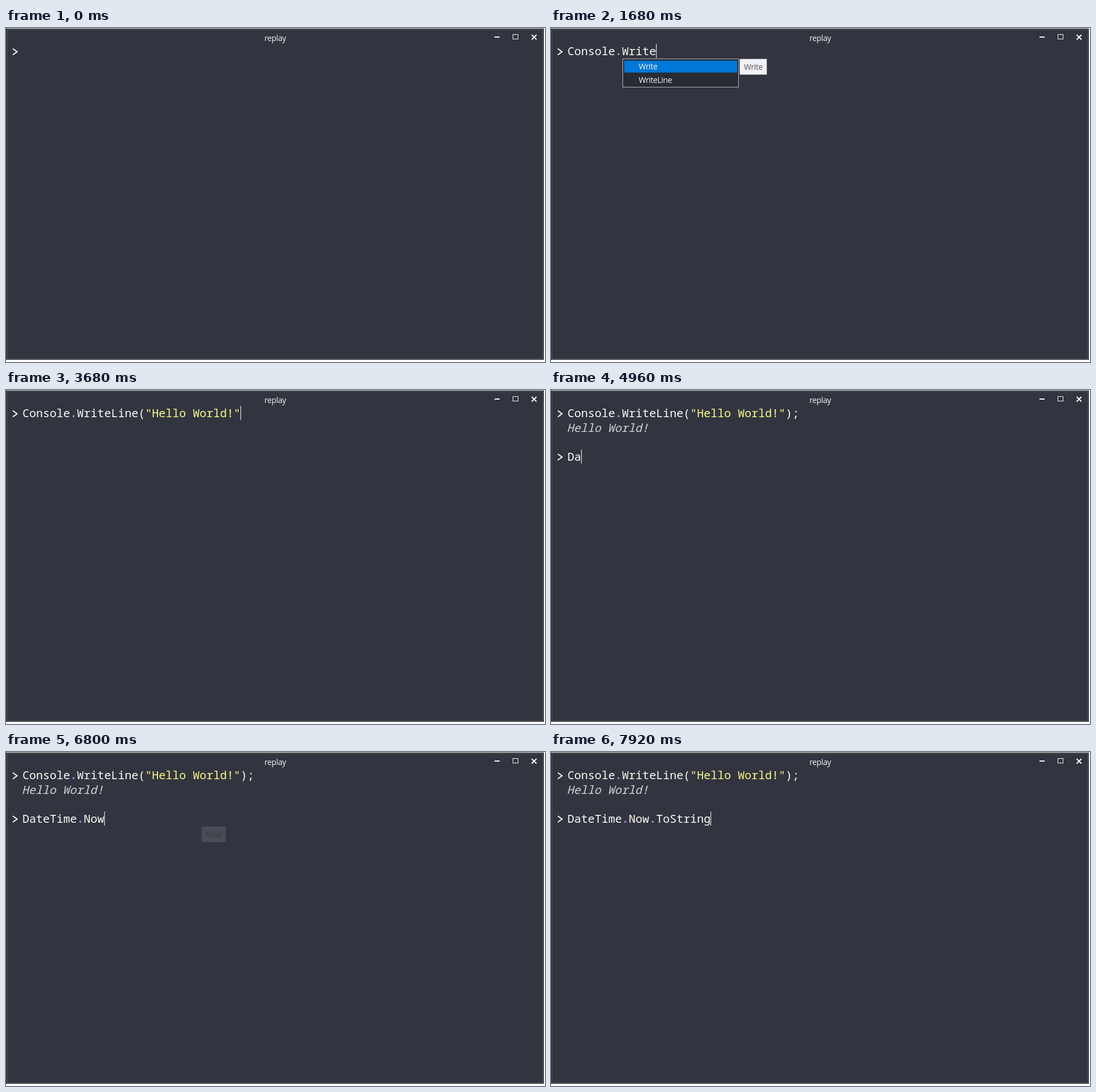
An HTML page for the animation above (8 s loop, 950 by 590 pixels).

```html
<!DOCTYPE html>
<html lang="en">
<head>
<meta charset="utf-8">
<title>replay</title>
<style>
html, body { margin: 0; width: 100%; height: 100%; overflow: hidden; background: #fff; }
svg { display: block; }
text { font: 14px "Open Sans", "Noto Sans", sans-serif; letter-spacing: -.38px; fill: #f2f2f0; white-space: pre; }
.code { font: 500 20.03px "Noto Sans Mono", monospace; letter-spacing: 0; fill: #fbfbf7; }
.dot { fill: #b47be8; font-weight: 700; }
.str { fill: #fbf98e; }
.out { font-style: italic; font-weight: 400; fill: #d2d3d0; }
.icon { fill: none; stroke: #f8f8f8; }
.caret { fill: #d8d8d8; }
.popup { fill: #292b34; stroke: #b2b3ba; }
.thumb { fill: #8a8a8b; }
.pick { fill: #0078d7; }
.tip rect { fill: #f1f2f7; stroke: #767676; }
.tip text { fill: #575757; }
</style>
</head>
<body>
<svg width="950" height="590" viewBox="0 0 950 590">
  <rect y="1" width="948" height="585" fill="#17191d"/>
  <rect x="1" y="2" width="946" height="583" fill="#5d6264"/>
  <rect x="2" y="3" width="944" height="581" fill="#32353f"/>
  <text x="474.5" y="22.5" text-anchor="middle">replay</text>
  <path class="icon" stroke-width="2" d="M861 16h9M926.5 12l8.5 8.5M935 12l-8.5 8.5"/>
  <rect class="icon" x="893.5" y="11.5" width="9" height="8"/>
  <g id="view"></g>
</svg>
<script>
const LOOP = 8000, CHAR = 12.02, LEFT = 29, ROW = 23.43, MAX_H = 350;
const FIRST = 'Console.WriteLine("Hello World!");';
const SECOND = 'DateTime.Now.ToString';

const consoleItems = `BackgroundColor Beep BufferHeight BufferWidth CancelKeyPress CapsLock Clear
  CursorLeft CursorSize CursorTop CursorVisible Equals Error ForegroundColor In InputEncoding
  IsErrorRedirected IsInputRedirected IsOutputRedirected KeyAvailable LargestWindowHeight
  LargestWindowWidth MoveBufferArea NumberLock OpenStandardError OpenStandardInput
  OpenStandardOutput Out OutputEncoding Read ReadKey ReadLine ReferenceEquals ResetColor
  SetBufferSize SetCursorPosition SetError SetIn SetOut SetWindowPosition SetWindowSize Title
  TreatControlCAsInput WindowHeight WindowLeft WindowTop WindowWidth Write WriteLine`.split(/\s+/);
const staticItems = `Compare DaysInMonth Equals FromBinary FromFileTime FromFileTimeUtc FromOADate
  IsLeapYear MaxValue MinValue Now Parse ParseExact ReferenceEquals SpecifyKind Today TryParse
  TryParseExact UnixEpoch UtcNow`.split(/\s+/);
const dateItems = `Add AddDays AddHours AddMilliseconds AddMinutes AddMonths AddSeconds AddTicks
  AddYears CompareTo Date Day DayOfWeek DayOfYear Equals GetDateTimeFormats GetHashCode GetType
  GetTypeCode Hour IsDaylightSavingTime Kind Millisecond Minute Month Second Subtract Ticks
  TimeOfDay ToBinary ToFileTime ToFileTimeUtc ToLocalTime ToLongDateString ToLongTimeString
  ToOADate ToShortDateString ToShortTimeString ToString ToUniversalTime Year`.split(/\s+/);

// Each step: time, line, typed characters, then flags.
const step = (time, line, typed, flags = {}) => ({ time, line, typed, ...flags });
const hidden = { noCaret: true };
const list = tip => ({ open: true, tip });
const steps = [
  step(0, 1, 0, hidden), step(80, 1, 0), step(160, 1, 1), step(240, 1, 2), step(400, 1, 3),
  step(480, 1, 4), step(640, 1, 5), step(720, 1, 6), step(800, 1, 7), step(960, 1, 8),
  step(1120, 1, 8, list(0)),
  step(1200, 1, 9, { ...list(.28), ...hidden }), step(1280, 1, 10, list(.9)),
  step(1440, 1, 11, list(1)), step(1520, 1, 12, list(1)), step(1600, 1, 13, list(1)),
  step(1760, 1, 14, list(1)), step(1840, 1, 15, list(1)), step(1920, 1, 17, list(1)),
  step(2080, 1, 18, { tip: .12 }), step(2240, 1, 19),
  step(2480, 1, 20), step(2560, 1, 22), step(2640, 1, 23), step(2800, 1, 25),
  step(2880, 1, 26), step(2960, 1, 27), step(3040, 1, 28), step(3200, 1, 30),
  step(3520, 1, 31), step(3680, 1, 32), step(3840, 1, 33), step(4000, 1, 34),
  step(4080, 1, 34, hidden), step(4160, 1, 34, { ...hidden, output: true }), step(4320, 2, 0),
  step(4720, 2, 0, hidden), step(4800, 2, 1), step(4960, 2, 2), step(5040, 2, 3),
  step(5200, 2, 4), step(5280, 2, 5), step(5360, 2, 6), step(5520, 2, 7), step(5600, 2, 8),
  step(5760, 2, 9),
  step(5920, 2, 9, list(0)), step(6080, 2, 10, list(.28)), step(6160, 2, 10, list(1)),
  step(6320, 2, 11, list(1)), step(6480, 2, 12, list(1)), step(6720, 2, 12, { tip: .6 }),
  step(6800, 2, 12, { tip: .12 }), step(6880, 2, 12),
  step(7040, 2, 13), step(7200, 2, 13, list(0)), step(7280, 2, 14, list(.28)),
  step(7360, 2, 15, list(1)), step(7520, 2, 17, list(1)),
  step(7840, 2, 21, { tip: .4 }), step(7920, 2, 21)
];

const rect = (cls, x, y, w, h, more = '') =>
  `<rect class="${cls}" x="${x}" y="${y}" width="${w}" height="${h}" ${more}/>`;
const label = (cls, x, y, str) => `<text class="${cls}" x="${x}" y="${y}">${str}</text>`;
const chevron = y => `<path class="icon" stroke-width="2" d="M12 ${y}l7.5 5.5l-7.5 5.5"/>`;
const paint = code => code.replace(/("[^"]*"?)|\./g,
  (part, str) => `<tspan class="${str ? 'str' : 'dot'}">${part}</tspan>`);

function popup(items, pick, x, y) {
  const n = items.length, full = n * ROW + 4, h = Math.round(Math.min(MAX_H, full));
  const scrolls = full > MAX_H, shown = (MAX_H - 12) / ROW;
  const top = scrolls ? Math.max(0, Math.min(pick - 7, Math.ceil(n - shown))) : 0;
  let rows = '';
  items.forEach((item, i) => {
    const mid = 14.2 + (i - top) * ROW;
    if (i === pick) rows += rect('pick', 3, mid - 10.5, scrolls ? 184 : 199, 21);
    rows += label('', 28.5, Math.round(mid + 5), item);
  });
  if (scrolls) {
    const track = MAX_H - 6;
    rows += rect('thumb', 188.5, 2.5 + track * top / n, 9.5, track * shown / n, 'rx="4"');
  }
  return rect('popup', x + .5, y + .5, 204, h - 1) +
    `<svg x="${x}" y="${y + 2}" width="203" height="${h - 4}" viewBox="0 2 203 ${h - 4}">${rows}</svg>`;
}

const ruler = document.createElement('canvas').getContext('2d');
function tooltip(str, x, y, opacity) {
  ruler.font = '14px "Open Sans", "Noto Sans", sans-serif';
  const w = Math.round(ruler.measureText(str).width - .38 * str.length + 16);
  return `<g class="tip" opacity="${opacity}">` +
    rect('', x + .5, y + .5, w - 1, 28) + label('', x + 8, y + 20, str) + '</g>';
}

function render(s) {
  const second = s.line === 2;
  const code = (second ? SECOND : FIRST).slice(0, s.typed);
  const y = second ? 105 : 28;
  let html = chevron(36.5) + label('code', LEFT, 48, paint(second ? FIRST : code));
  if (second || s.output) html += label('code out', LEFT - 1, 74, 'Hello World!');
  if (second) html += chevron(113) + label('code', LEFT, 125, paint(code));
  if (!s.noCaret) html += rect('caret', Math.floor(LEFT + s.typed * CHAR), y, 1.25, 25);

  if (s.open || s.tip) {
    const [start, all] = !second ? [8, consoleItems] : s.typed < 13 ? [9, staticItems] : [13, dateItems];
    const query = code.slice(start).replace('(', '');
    const items = all.filter(item => item.toLowerCase().includes(query.toLowerCase()));
    const pick = query ? items.findIndex(item => item.startsWith(query)) : -1;
    const x = Math.ceil(LEFT + start * CHAR), top = y + 26;
    if (s.open) html += popup(items, pick, x, top);
    if (s.tip) html += tooltip(items[pick], x + 206, top, s.tip);
  }
  view.innerHTML = html;
}

const view = document.getElementById('view');
let current;
function tick() {
  const t = performance.now() % LOOP;
  const next = steps.findLast(s => s.time <= t);
  if (next !== current) render(current = next);
  requestAnimationFrame(tick);
}
tick();
</script>
</body>
</html>
```
